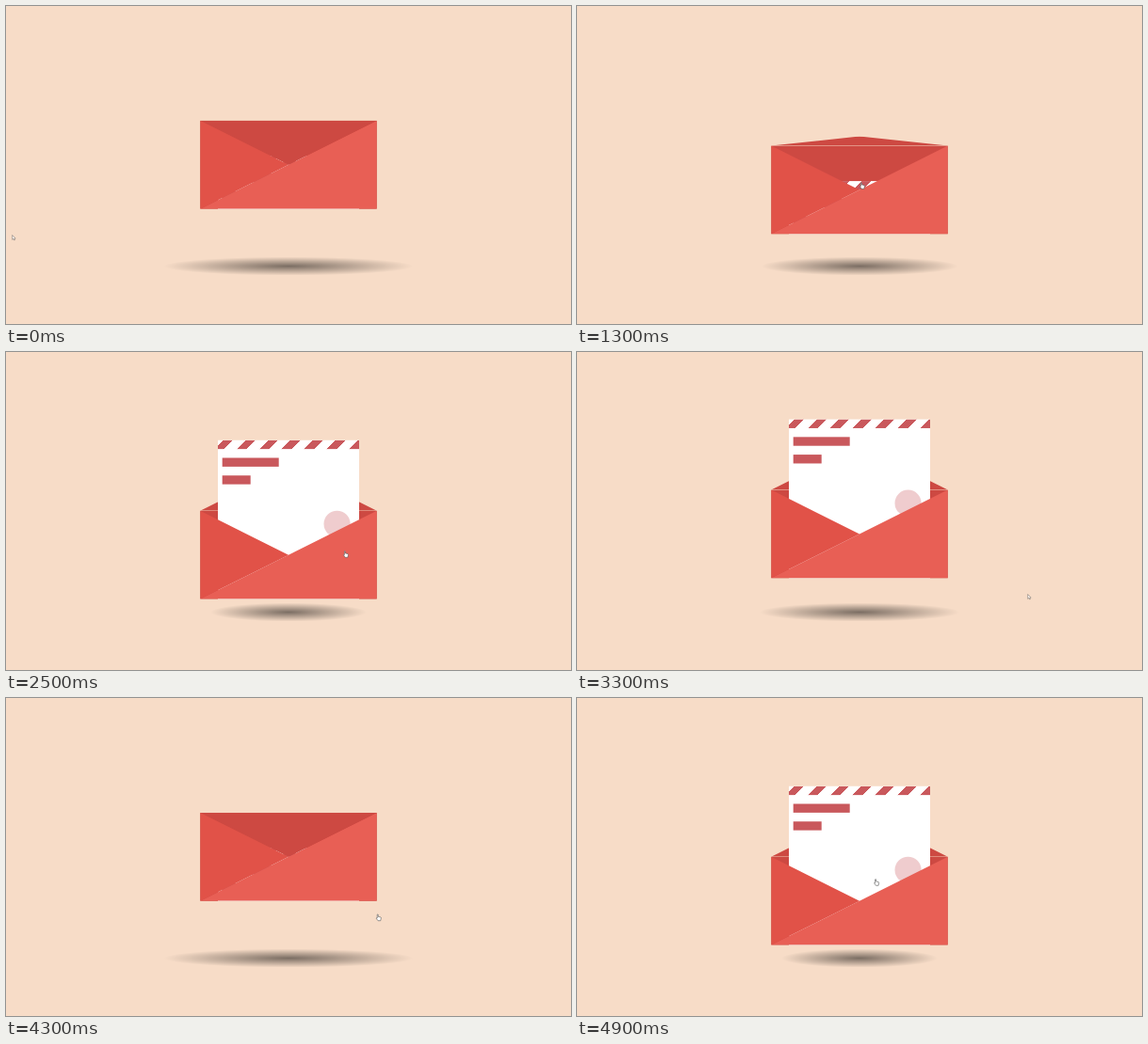
An HTML page for the animation above (5000 ms loop, 600 by 338 pixels).

```html
<!DOCTYPE html>
<html lang="en">
<head>
<meta charset="utf-8">
<title>Envelope</title>
<style>
  html, body { margin: 0; width: 100%; height: 100%; overflow: hidden; background: #f7dcc7; }
  #stage { position: absolute; left: 0; top: 0; width: 640px; height: 360px; transform: scale(.9375); transform-origin: 0 0; }
  #stage div { position: absolute; }
  #mail { left: 220px; top: 130px; width: 200px; height: 100px; }
  #back, #pocket, #side { width: 200px; height: 100px; }
  #back { background: #cd4942; }
  #pocket { background: #e85f55; clip-path: polygon(0 100%, 100% 0, 100% 100%); z-index: 2; }
  #side { background: #e15248; clip-path: polygon(0 0, 50% 50%, 0 100%); z-index: 4; }
  #lid { width: 200px; height: 50px; background: #cd4942; clip-path: polygon(0 0, 100% 0, 50% 100%); transform-origin: 50% 0; }
  #letter { left: 20px; bottom: 0; width: 160px; background: #fff; overflow: hidden; z-index: 1; }
  #border { width: 160px; height: 10px; background: repeating-linear-gradient(-45deg, #c9585c, #c9585c 8px, transparent 8px, transparent 18px); }
  .line { left: 5px; height: 10px; background: #c9585c; }
  #title { top: 20px; width: 64px; }
  #context { top: 40px; width: 32px; }
  #stamp { left: 120px; top: 80px; width: 30px; height: 30px; border-radius: 50%; background: #c9585c; opacity: .3; }
  #shadow { left: 320px; top: 280px; height: 30px; transform: translateX(-50%); border-radius: 50%; background: radial-gradient(rgba(0,0,0,.5), rgba(0,0,0,0), rgba(0,0,0,0)); }
  svg { position: absolute; left: 0; top: 0; width: 8px; height: 10px; overflow: visible; }
  svg path { fill: #fff; stroke: #555; stroke-width: .6; stroke-linejoin: round; }
  #arrow { opacity: .75; }
</style>
</head>
<body>
<div id="stage">
  <div id="shadow"></div>
  <div id="mail">
    <div id="back"></div>
    <div id="lid"></div>
    <div id="letter">
      <div id="border"></div>
      <div id="title" class="line"></div>
      <div id="context" class="line"></div>
      <div id="stamp"></div>
    </div>
    <div id="pocket"></div>
    <div id="side"></div>
  </div>
</div>
<svg id="cursor">
  <path id="arrow" d="M.7.5V5.4L1.9 4.4 2.7 6 3.4 5.7 2.7 4.1H4.2Z"/>
  <path id="hand" d="M1.4.8Q2 .2 2.4.8V3L5 3.5Q5.6 3.7 5.4 4.8L4.9 7.3H2.2L.4 4.8Q.4 4 1.4 4.6Z"/>
</svg>
<script>
  const LOOP = 5000, STEP = 100, DURATION = 400;
  const ENTER = 1168, LEAVE = 3188, REENTER = 4298;
  const LID_CLOSE_DELAY = 414;

  // Pointer path: time, x, y
  const PATH = [
    [0, 6, 243], [200, 9, 245], [600, 63, 268], [1000, 130, 270], [1168, 206, 250],
    [1300, 300, 187], [1800, 300, 187], [2400, 357, 210], [2500, 358, 211], [3100, 358, 211],
    [3188, 394, 232], [3300, 478, 257], [3700, 474, 256], [4000, 470, 255], [4298, 394, 230],
    [4400, 335, 200], [4500, 316, 192], [5000, 315, 192]
  ];

  const el = id => document.getElementById(id);
  const mix = (a, b, p) => a + (b - a) * p;

  // cubic-bezier(.25, .1, .25, 1)
  function ease(x) {
    if (x <= 0) return 0;
    if (x >= 1) return 1;
    const curve = (a, b, s) => 3 * a * s * (1 - s) ** 2 + 3 * b * s * s * (1 - s) + s ** 3;
    let low = 0, high = 1;
    for (let i = 0; i < 24; i++) {
      const mid = (low + high) / 2;
      if (curve(.25, .25, mid) < x) low = mid; else high = mid;
    }
    return curve(.1, 1, low);
  }

  function openness(t, openDelay, closeDelay) {
    const since = start => ease((t - start) / DURATION);
    if (t >= REENTER) return since(REENTER + openDelay);
    if (t >= LEAVE) return 1 - since(LEAVE + closeDelay);
    return since(ENTER + openDelay);
  }

  function lidInFront(t) {
    if (t >= REENTER) return t < REENTER + 36;
    return t < ENTER + 36 || t > LEAVE + LID_CLOSE_DELAY + 85;
  }

  function pointer(t) {
    const i = PATH.findIndex(point => point[0] > t);
    const [t0, x0, y0] = PATH[i - 1], [t1, x1, y1] = PATH[i];
    const p = (t - t0) / (t1 - t0);
    return [mix(x0, x1, p), mix(y0, y1, p)];
  }

  function draw(t) {
    const drop = openness(t, 0, 0);
    const angle = Math.PI * openness(t, 0, LID_CLOSE_DELAY);
    el("mail").style.transform = `translateY(${50 * drop}px)`;
    el("shadow").style.width = mix(400, 250, drop) + "px";
    el("letter").style.height = mix(60, 180, openness(t, 200, 200)) + "px";
    el("lid").style.transform = `scaleY(${Math.cos(angle)})`;
    el("lid").style.zIndex = lidInFront(t) ? 3 : 0;

    const [x, y] = pointer(t);
    const hovering = (t >= ENTER && t < LEAVE) || t >= REENTER;
    el("cursor").style.transform = `translate(${x}px, ${y}px)`;
    el("hand").style.display = hovering ? "" : "none";
    el("arrow").style.display = hovering ? "none" : "";
  }

  const start = performance.now();
  function tick() {
    const t = (performance.now() - start) % LOOP;
    draw(Math.floor(t / STEP) * STEP);
    requestAnimationFrame(tick);
  }
  tick();
</script>
</body>
</html>
```
